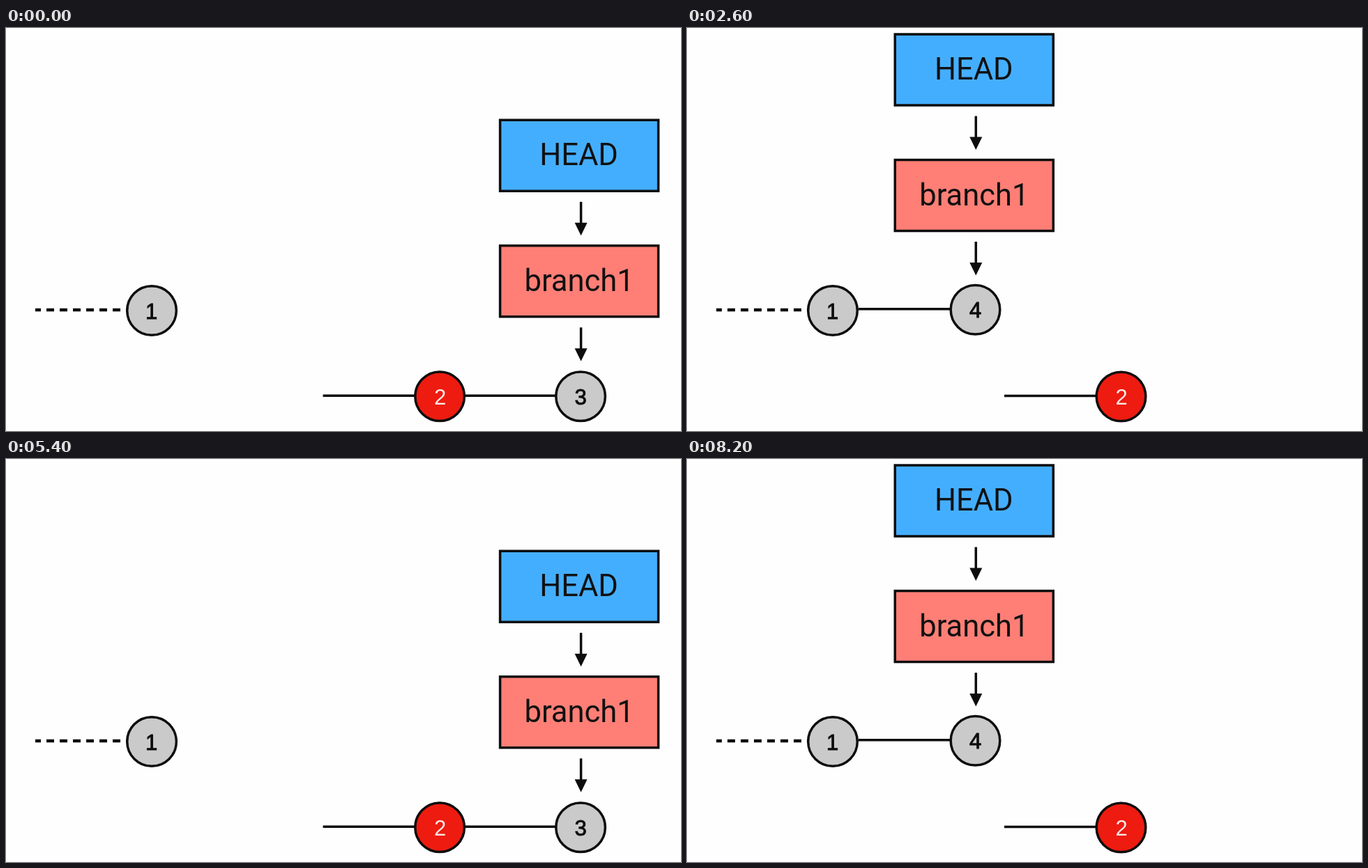
These frames come from a looping animation (968x579 px, 8.4 s). An HTML page:

```html
<!DOCTYPE html>
<html lang="en">
<head>
<meta charset="utf-8">
<title>Rewriting a branch</title>
<style>
  html, body { margin: 0; width: 100%; height: 100%; overflow: hidden; background: #fefefe; }
  svg { display: block; width: 968px; height: 579px; }
  .edge { stroke: #0d0d0d; stroke-width: 3.5; fill: none; }
  .dash { stroke-width: 4.5; stroke-dasharray: 11 8; stroke-dashoffset: 3; }
  .tip { fill: #0d0d0d; }
  .label { font: 43.5px Roboto, sans-serif; fill: #111; text-anchor: middle; }
  .digit { font: 31px "Liberation Sans", Arial, sans-serif; fill: #0d0d0d; stroke: #0d0d0d; stroke-width: .9; text-anchor: middle; }
  .light { fill: #fbe9e7; stroke: none; }
</style>
</head>
<body>
<svg viewBox="0 0 968 579">
  <defs>
    <g id="arrow">
      <path class="edge" d="M0 0V34"/>
      <path class="tip" d="M-9 30H9L0 48.5Z"/>
    </g>
    <path id="link" class="edge" d="M-167.500 -1H-35"/>
  </defs>

  <path class="edge dash" d="M42 405H173"/>

  <g id="moving">
    <use href="#link"/>
    <circle class="edge" r="35.300" style="fill:#cacaca"/>
    <text id="three" class="digit" y="11.500">3</text>
    <text id="four" class="digit" y="11.500">4</text>
  </g>

  <g id="dropped">
    <use href="#link"/>
    <circle class="edge" r="35.300" style="fill:#ee1b10"/>
    <text class="digit light" x=".5" y="11.500">2</text>
  </g>

  <g transform="translate(209 406)">
    <circle class="edge" r="35.300" style="fill:#cacaca"/>
    <text class="digit" x="-.5" y="11.500">1</text>
  </g>

  <g id="refs">
    <rect class="edge" x="-114" y="9" width="227" height="102" style="fill:#44aefe"/>
    <text class="label" x="-1" y="74">HEAD</text>
    <use href="#arrow" x="2" y="126.500"/>
    <rect class="edge" x="-114" y="189.500" width="227" height="102" style="fill:#ff7f76"/>
    <text class="label" x="-.5" y="254.500">branch1</text>
    <use href="#arrow" x="2" y="307"/>
  </g>
</svg>

<script>
const LOOP = 8400, STEP = 200;
const CYCLE = 5400, PHASE = 1800, MOVE = 960;
// start of each move within a cycle
const DETACH = 868, REPLAY = 2423, RETARGET = 3390;

const el = id => document.getElementById(id);
const [moving, dropped, refs, three, four] =
  ["moving", "dropped", "refs", "three", "four"].map(el);

const ease = (t, start) => {
  const p = Math.min(1, Math.max(0, (t - start) / MOVE));
  return (1 - Math.cos(Math.PI * p)) / 2;
};
const mix = (a, b, k) => a + (b - a) * k;
const place = (node, x, y) => node.setAttribute("transform", `translate(${x} ${y})`);

function draw(time) {
  const t = (Math.floor(time / STEP) * STEP + PHASE) % CYCLE;
  const away = ease(t, DETACH), replay = ease(t, REPLAY), follow = ease(t, RETARGET);
  const dx = 212.5 * away, dy = 123.5 * away;

  place(dropped, 410 + dx, 406 + dy);
  place(moving, mix(612 + dx, 413.5, replay), mix(406 + dy, 404.8, replay));
  place(refs, mix(610.5 + dx, 412.3, follow), mix(dy, 0, follow));
  three.style.opacity = 1 - replay;
  four.style.opacity = replay;
}

const began = performance.now();
function tick() {
  draw((performance.now() - began) % LOOP);
  requestAnimationFrame(tick);
}
tick();
</script>
</body>
</html>
```
